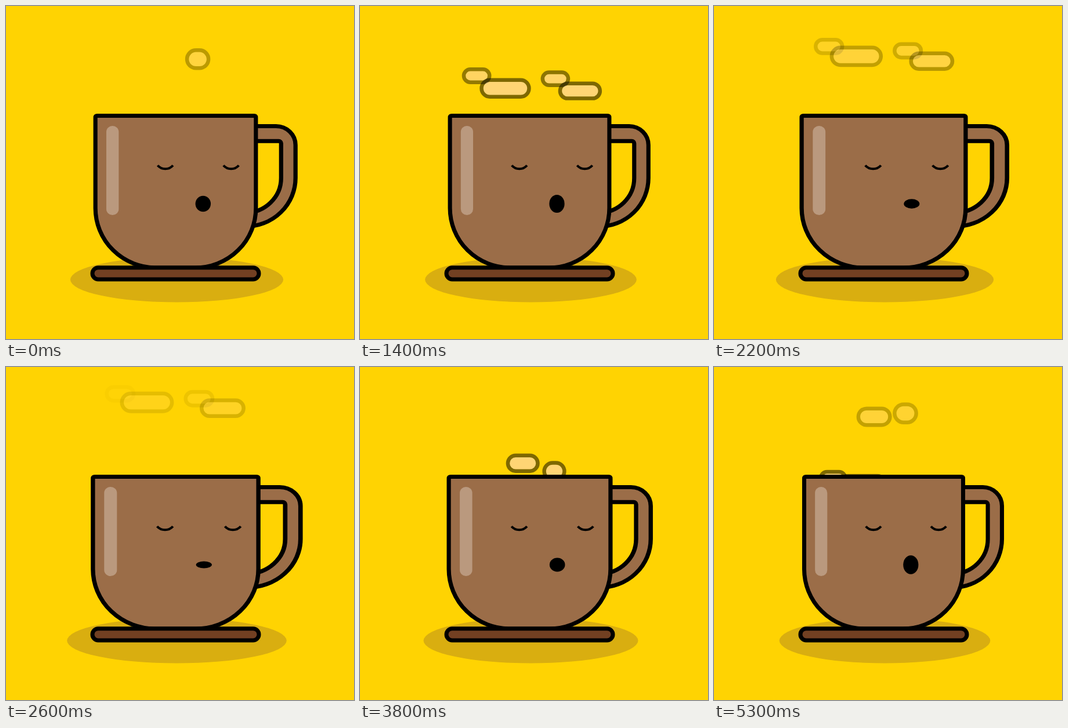
Write an HTML page that moves like this. It is 600x575 px and loops after 5.4 s.

```html
<!DOCTYPE html>
<html lang="en">
<head>
<meta charset="utf-8">
<title>Sleepy coffee cup</title>
<style>
  html, body { margin: 0; width: 100%; height: 100%; overflow: hidden; background: #ffd302; }
  svg { display: block; width: 100vw; height: 100vh; }
  .line { stroke: #000; stroke-width: 7; }
  .brown { fill: #9b6d48; }
  .eye { fill: none; stroke: #000; stroke-width: 4; }
  #steam rect { fill: #ffd7e6; stroke: #000; stroke-width: 6.5; }
</style>
</head>
<body>
<svg viewBox="0 0 600 575">
  <ellipse id="shadow" cx="294.5" cy="472.5" rx="180.5" ry="39" fill="#d9ae10"/>
  <g id="steam"></g>
  <g id="cup">
    <g id="handle" class="line">
      <path class="brown" d="M405 207.5H462A32.5 32.5 0 0 1 494.5 240V297A84 84 0 0 1 410.5 381H405Z"/>
      <path fill="#ffd302" d="M405 233.3H466.5A4 4 0 0 1 470.5 237.3V297A60 60 0 0 1 410.5 357H405Z"/>
    </g>
    <path class="line brown" d="M159.5 189.5H425.5Q428.5 189.5 428.5 192.5V349A103 103 0 0 1 325.5 452H259.5A103 103 0 0 1 156.5 349V192.5Q156.5 189.5 159.5 189.5Z"/>
    <rect x="175" y="207" width="21" height="154" rx="10.5" fill="#ba997e"/>
    <path class="eye" d="M262 275.3A17 17 0 0 0 288 275.3M373.5 275.3A17 17 0 0 0 399.5 275.3"/>
    <ellipse id="mouth" cx="339" cy="341.5" rx="13" ry="18"/>
  </g>
  <rect class="line" x="149" y="451.7" width="287" height="20.3" rx="10" fill="#724022"/>
</svg>
<script>
const LOOP = 5400, STEP = 100;
const RIM = 180, RISE = 140, HIDDEN = 500;
const $ = id => document.getElementById(id);
const clamp = (v, lo, hi) => Math.min(hi, Math.max(lo, v));
const easeRise = p => p * (1.12 - .12 * p);

// at: times of leaving the rim, dur: time to fade out,
// x: centre at the rim, drift: shift to the left over the whole rise
const puffs = [
  { at: [540, 5459], dur: 2170, x: 204.5, drift: 8, w: 51, h: 29 },
  { at: [893, 5581], dur: 2050, x: 254, drift: 13, w: 90, h: 36 },
  { at: [570], dur: 2300, x: 340, drift: 8, w: 51, h: 29 },
  { at: [915], dur: 2230, x: 382, drift: 11, w: 77, h: 33 },
  { at: [3560], dur: 2700, x: 281.5, drift: 8, w: 60, h: 34.5 },
  { at: [-1310, 3800], dur: 2180, x: 335, drift: 7, w: 43, h: 37 }
];

for (const p of puffs) {
  p.el = document.createElementNS('http://www.w3.org/2000/svg', 'rect');
  $('steam').append(p.el);
}

function setAttrs(el, attrs) {
  for (const key in attrs) el.setAttribute(key, attrs[key]);
}

function stretch(id, origin, s) {
  $(id).setAttribute('transform', `translate(${origin} 0) scale(${s} 1) translate(${-origin} 0)`);
}

function drawPuff({ el, at, dur, x, drift, w, h }, t) {
  const start = at.find(s => t > s - HIDDEN && t < s + dur);
  const rise = start === undefined ? 1 : easeRise((t - start) / dur);
  const y = RIM - RISE * rise;
  const grow = .96 + .085 * rise;
  const width = w * grow - 6.5, height = h * grow - 6.5;
  setAttrs(el, {
    x: x - drift * rise - width / 2, y: y - height / 2,
    width, height, rx: height / 2,
    opacity: clamp((y - 43) / 187, 0, .5)
  });
}

function draw(t) {
  const breath = (1 - Math.cos(Math.PI * (t - 800) / 2000)) / 2;
  const s = 1 + .05 * breath;
  stretch('shadow', 294.5, s);
  stretch('cup', 292.5, s);
  stretch('handle', 428, s);
  $('mouth').setAttribute('ry', 18.2 - 12.6 * breath);
  for (const p of puffs) drawPuff(p, t);
}

const begin = performance.now();
function tick() {
  const t = (performance.now() - begin) % LOOP;
  draw(Math.floor(t / STEP) * STEP);
  requestAnimationFrame(tick);
}
tick();
</script>
</body>
</html>
```
